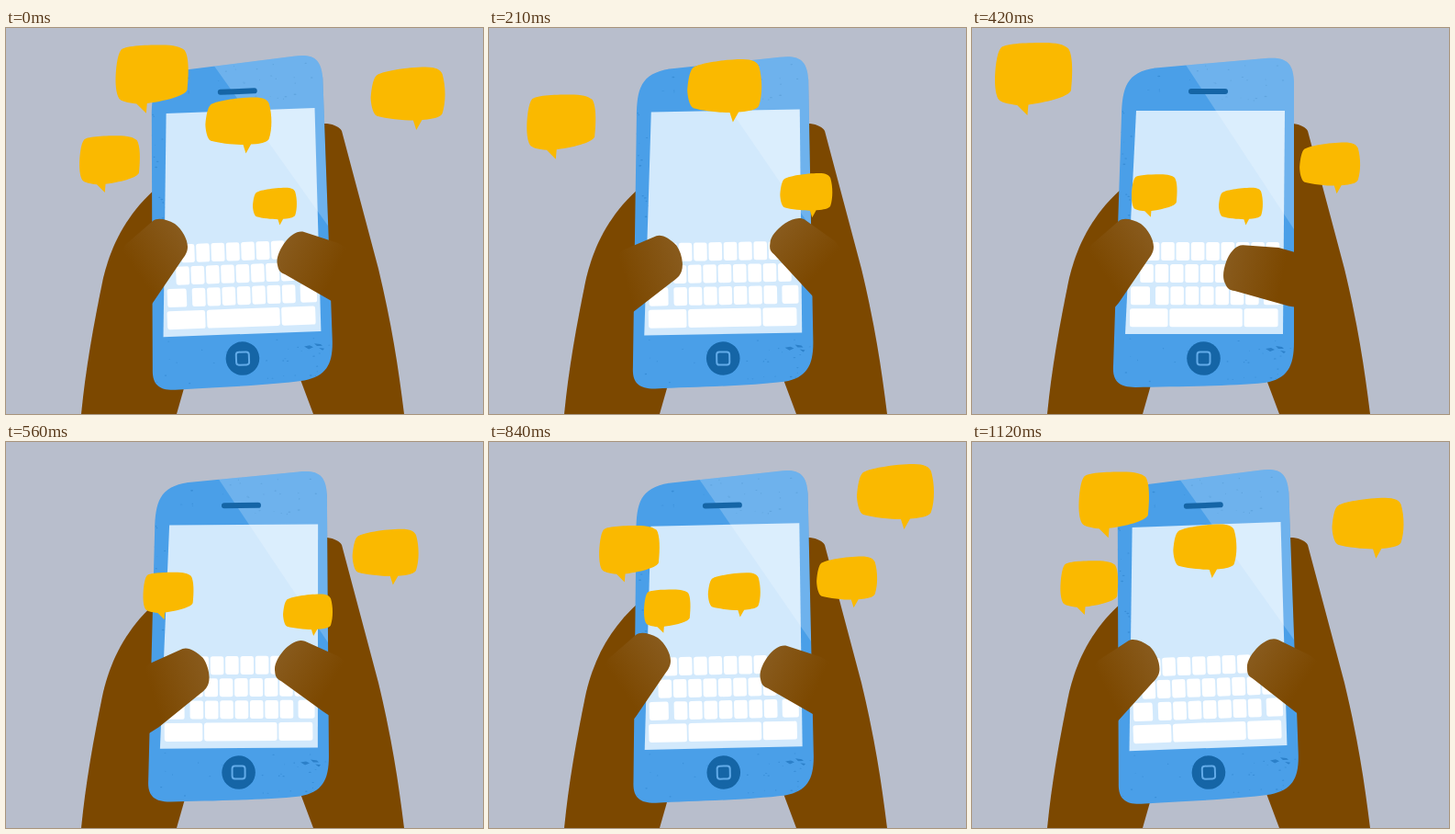
An HTML page that plays this animation: 520x420 px, repeating every 1.19 s.

```html
<!DOCTYPE html>
<html lang="en">
<head>
<meta charset="utf-8">
<title>Messages</title>
<style>
  html, body { margin: 0; width: 100%; height: 100%; overflow: hidden; background: #b8becc; }
  svg { display: block; width: 520px; height: 420px; }
  .hand { fill: #7c4800; }
  .bubble { fill: #fab900; }
  .speck { fill: #2c80c9; }
  .dark { fill: #1565a6; }
</style>
</head>
<body>
<svg viewBox="0 0 520 420">
  <defs>
    <linearGradient id="glowL" gradientUnits="userSpaceOnUse" x1="188" y1="220" x2="136" y2="256">
      <stop offset="0" stop-color="#885a1c"/><stop offset="1" stop-color="#7c4800"/>
    </linearGradient>
    <linearGradient id="glowR" gradientUnits="userSpaceOnUse" x1="304" y1="236" x2="360" y2="262">
      <stop offset="0" stop-color="#885a1c"/><stop offset="1" stop-color="#7c4800"/>
    </linearGradient>
    <path id="body" d="M163 95C164 65 168 48 200 43.500L320 33C342 31 350 37 351 58V342C351 368 344 382 319 386C280 390 220 390 178 391C160 391 153 384 154 368Z"/>
    <clipPath id="inBody"><use href="#body"/></clipPath>
    <path id="tailLeft" d="M-42 8C-42-5-40-22-36-27C-33-32-10-33 10-33C25-33 32-31 37-27C42-20 42 0 40 18C38 24 20 30-6 33.500L-7 45L-18 34C-28 33-36 31-38 28C-41 24-42 14-42 8Z"/>
    <path id="tailRight" d="M-42 4C-41-8-39-17-36-20C-32-25 0-30 20-30C32-30 37-27 39-22C43-8 43 10 39 22C38 26 30 28 22 29L16 29.500L9.500 41L6 30C-5 30-25 28-35 25C-40 23-42 10-42 4Z"/>
  </defs>

  <path class="hand" d="M165 173C132 202 115 235 106 272C95 325 87 370 82 420H186L196 385Z"/>
  <path class="hand" d="M340 104H350C358 105 364 108 366 112L406 262C420 320 428 370 434 420H335L320 380L340 300Z"/>

  <g id="phone">
    <use href="#body" fill="#4a9fe8"/>
    <g clip-path="url(#inBody)">
      <g id="specks" class="speck" opacity=".55"></g>
      <path class="speck" d="M320 349l6-1 4 2-5 2zM331 346l7 1 2 2-6 0zM336 351l6 1-2 2z"/>
      <path d="M179 90H341L339 333H167Z" fill="#d2e9fc"/>
      <path d="M229 34L351 219H380V20H229Z" fill="#fff" opacity=".2"/>
      <g id="keys" fill="#fff"></g>
      <rect class="dark" x="236" y="66" width="43" height="6" rx="3"/>
      <circle class="dark" cx="252.500" cy="359.500" r="18.300"/>
      <rect x="245.500" y="352.500" width="14" height="14" rx="3" fill="none" stroke="#62abe9" stroke-width="2"/>
    </g>
  </g>

  <path id="thumbL" fill="url(#glowL)" d="M118 262L130 236L160 210C165 206 175 208 184 213C192 219 198 230 198 238C198 244 195 248 192 252L160 299L140 322C115 318 108 290 118 262Z"/>
  <path id="thumbR" fill="url(#glowR)" d="M390 250L362 234L325 222C318 220 311 225 305 232C298 241 294 251 296 258C297 264 299 266 304 268L353 296C370 306 395 310 398 290Z"/>
  <g id="bubbles" class="bubble"></g>
</svg>

<script>
const STEP = 70, COUNT = 17;
const $ = id => document.getElementById(id);

function add(parent, tag, attrs) {
  const el = document.createElementNS('http://www.w3.org/2000/svg', tag);
  for (const k in attrs) el.setAttribute(k, attrs[k]);
  return parent.appendChild(el);
}

// Keyboard: four rows, each laid out from its left end
function keyRow(row, x, widths) {
  for (const width of widths) {
    add($('keys'), 'rect', { x, y: 233 + row * 24.1, width, height: 20, rx: 2.5 });
    x += width + 1.8;
  }
}
const letters = n => Array(n).fill(14.55);
keyRow(0, 173.5, letters(10));
keyRow(1, 183.3, letters(9));
keyRow(2, 173, [21]);
keyRow(2, 200, letters(7));
keyRow(2, 318, [18]);
keyRow(3, 172, [41.5, 79.5, 37]);

// Worn paint on the phone's rim
let seed = 7;
const rnd = () => (seed = seed * 16807 % 2147483647) / 2147483647;
function speckle(n, x, y, w, h) {
  while (n--) add($('specks'), 'ellipse', {
    cx: x + rnd() * w, cy: y + rnd() * h, rx: .4 + rnd() * 1.1, ry: .3 + rnd() * .5
  });
}
speckle(34, 158, 338, 190, 48);
speckle(28, 170, 40, 170, 40);
speckle(14, 158, 80, 18, 140);

// One swing out and back between beats a and b
const swing = (n, a, b) => n > a && n < b ? Math.sin(Math.PI * (n - a) / (b - a)) : 0;
const taps = (n, p, q, r) => p * swing(n, 0, 6) + q * swing(n, 6, 12) + r * swing(n, 12, 17);

function pose(id, angle, pivot, shift = 0) {
  $(id).setAttribute('transform', `translate(${shift} 0) rotate(${angle} ${pivot})`);
}

// Cubic curve through control values
const bezier = (u, [a, b, c, d]) => {
  const v = 1 - u;
  return a * v * v * v + 3 * u * v * (b * v + c * u) + d * u * u * u;
};

const toRight = { shape: 'tailRight', x: [293, 368, 427, 443], y: [191, 188, 125, 54], life: 12, from: 48, to: 84 };
const toTop = { ...toRight, x: [293, 248, 249, 259], y: [191, 160, 98, 51] };
const toLeft = { shape: 'tailLeft', x: [194.5, 132.5, 64, 67.5], y: [180.5, 169.5, 120, 49.5], life: 11, from: 51, to: 85 };
const toTopLeft = { ...toLeft, x: [199, 153, 140.5, 159.5], y: [179, 157, 96, 50], from: 50, to: 80 };

const bubbles = [
  { start: 0, ...toRight },
  { start: 6, ...toRight },
  { start: 9, ...toTop },
  { start: 6, ...toTopLeft },
  { start: 12, ...toLeft }
];
for (const b of bubbles) b.el = add($('bubbles'), 'use', { href: '#' + b.shape });

function drawBubble({ el, start, x, y, life, from, to }, n) {
  const u = (n - start + COUNT) % COUNT / life;
  el.setAttribute('visibility', u <= 1 ? 'visible' : 'hidden');
  el.setAttribute('transform',
    `translate(${bezier(u, x)} ${bezier(u, y)}) scale(${(from + (to - from) * u) / 84})`);
}

function draw(n) {
  const tilt = n < 6 ? 1 - n / 6 : (n - 6) / 10;
  const press = Math.max(0, 1 - Math.abs(n - 6) / 3);
  pose('phone', -2.1 * tilt, '256 211');
  pose('thumbL', taps(n, 18, 19.5, 13.5), '120 289', 13 * swing(n, 6, 12));
  pose('thumbR', taps(n, 17.5, 12.5, 14) - 14 * press, '377 280', -17 * press);
  for (const b of bubbles) drawBubble(b, n);
}

const origin = performance.now();
function tick() {
  draw(Math.floor((performance.now() - origin) / STEP) % COUNT);
  requestAnimationFrame(tick);
}
tick();
</script>
</body>
</html>
```
